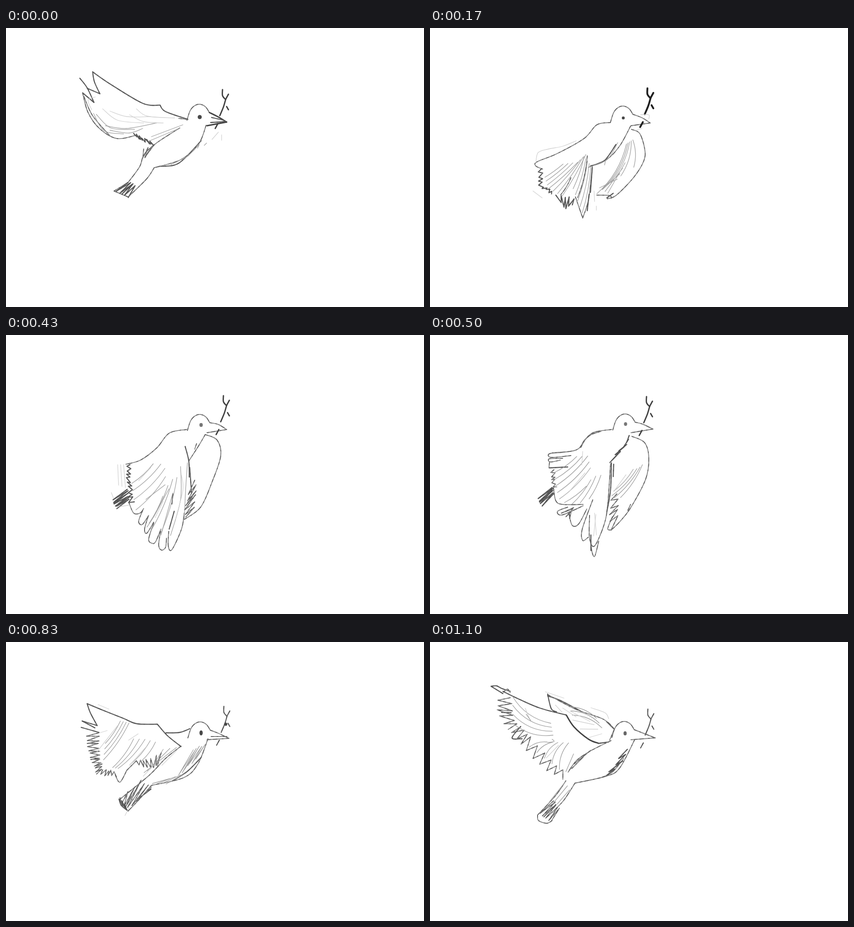
Animation of 917x611 px, one loop 1170 ms. Source, as an HTML page with a canvas:

```html
<!DOCTYPE html>
<html lang="en">
<head>
<meta charset="utf-8">
<title>Dove in flight</title>
<style>
html, body { margin: 0; width: 100%; height: 100%; overflow: hidden; background: #fff; }
canvas { display: block; width: 100%; height: 100%; }
</style>
</head>
<body>
<canvas width="917" height="611"></canvas>
<script>
const ctx = document.querySelector("canvas").getContext("2d");
const tones = {
  faint: ["#d2d2d2", 1.3],
  thin: ["#a0a0a0", 1.3],
  line: ["#868686", 1.9],
  dark: ["#606060", 2.3],
  twig: ["#414141", 2.9],
  ink: ["#202020", 4]
};

function parse(text) {
  const n = text.trim().split(/\s+/).map(Number);
  return n.filter((_, i) => i % 2 === 0).map((x, i) => [x, n[2 * i + 1]]);
}

function stroke(tone, path) {
  [ctx.strokeStyle, ctx.lineWidth] = tones[tone];
  ctx.setLineDash([]);
  ctx.stroke(path);
  if (tone !== "line" && tone !== "dark") return;
  // Broken darker strokes give the outlines an uneven pencil pressure.
  ctx.strokeStyle = "rgba(72,72,72,.65)";
  ctx.lineWidth = 1.7;
  ctx.setLineDash([5, 8, 2, 11, 8, 6]);
  ctx.stroke(path);
}

// Smooth strokes through points; commas separate the strokes.
function curve(tone, text) {
  for (const part of text.split(",")) {
    const p = parse(part), path = new Path2D();
    path.moveTo(...p[0]);
    for (let i = 1; i < p.length; i++) {
      const a = p[i - 1], b = p[i], before = p[i - 2] || a, after = p[i + 1] || b;
      path.bezierCurveTo(
        a[0] + (b[0] - before[0]) / 6, a[1] + (b[1] - before[1]) / 6,
        b[0] - (after[0] - a[0]) / 6, b[1] - (after[1] - a[1]) / 6, ...b);
    }
    stroke(tone, path);
  }
}

// Point at share t of a guide polyline.
function along(p, t) {
  const s = t * (p.length - 1), i = Math.min(Math.floor(s), p.length - 2);
  return [0, 1].map(k => p[i][k] + (p[i + 1][k] - p[i][k]) * (s - i));
}

// Pencil hatching that runs back and forth between two guides.
function zig(tone, count, from, to) {
  const guides = [parse(from), parse(to)], path = new Path2D();
  for (let i = 0; i <= count; i++) {
    const [x, y] = along(guides[i % 2], i / count);
    path.lineTo(x + 1.5 * Math.sin(i * 7), y + 1.5 * Math.sin(i * 5));
  }
  stroke(tone, path);
}

// Bowed feather lines from one guide to another.
function fan(tone, count, from, to, bow = 0) {
  const a = parse(from), b = parse(to), path = new Path2D();
  for (let i = 0; i < count; i++) {
    const [x, y] = along(a, i / (count - 1)), [u, v] = along(b, i / (count - 1));
    path.moveTo(x, y);
    path.quadraticCurveTo((x + u) / 2 - (v - y) * bow, (y + v) / 2 + (u - x) * bow, u, v);
  }
  stroke(tone, path);
}

function head(x, y, tipX, tipY, beak) {
  ctx.save();
  ctx.translate(x, y);
  curve("line", "397 207 404 186 414 175 426 172 438 178 446 190");
  ctx.restore();
  curve(beak, `${446 + x} ${190 + y} 466 ${tipY - 11} ${tipX} ${tipY}, ${tipX} ${tipY} 441 214`);
}

function eye(x, y, rx, ry = rx, color = "#484848") {
  ctx.fillStyle = color;
  ctx.beginPath();
  ctx.ellipse(x, y, rx, ry, 0, 0, 7);
  ctx.fill();
}

function twig(x, y, tone = "twig", stub = true) {
  ctx.save();
  ctx.translate(x, y);
  curve(tone, "0 0 0 13 6 21, 13 10 7 21, 7 21 2 38 -6 57, 9 37 13 44");
  if (stub) curve(tone, "-10 74 -16 85");
  ctx.restore();
}

function raised() {
  head(0, -5, 484, 206, "twig");
  curve("dark", "451 196 478 202, 449 207 481 205");
  eye(425, 195, 4.5);
  twig(475, 135);
  curve("dark", "190 96 229 123 300 165 338 169, 338 169 350 183 399 200, 162 110 178 131 193 163");
  curve("dark", "168 142 193 163, 178 132 206 144, 206 144 194 118 190 96, 336 303 379 296 428 247");
  curve("line", "168 142 180 185 205 220 243 242 285 235, 171 150 190 192 228 236, 398 200 379 198");
  curve("line", "381 219 330 252 303 277 293 304 268 338, 439 213 423 253 384 288 325 306");
  curve("line", "325 306 308 331 268 370, 268 370 237 357, 237 357 268 338");
  zig("dark", 17, "280 231 319 250", "284 239 324 257");
  zig("dark", 9, "268 338 286 345", "238 357 268 370");
  zig("thin", 13, "345 301 395 285 428 250", "340 304 385 291 420 262");
  zig("line", 6, "302 265 327 257", "297 288 310 278");
  curve("thin", "198 189 230 219 282 222, 192 187 215 225 258 232, 218 214 264 220 330 208");
  curve("thin", "228 224 270 230 300 220, 319 238 388 212, 313 248 382 219, 440 252 435 257");
  curve("faint", "212 177 245 202 302 208, 228 182 265 194 317 194, 271 190 302 205 345 208");
  curve("faint", "286 177 310 193 370 197, 466 228 452 244, 473 234 473 246, 196 151 180 158 188 179");
}

function falling() {
  head(-1, -1, 483, 208, "line");
  eye(424, 197, 3.2);
  twig(477, 132, "ink");
  curve("line", "396 207 366 212 338 242 279 275 235 293 232 302 247 309");
  curve("line", "442 222 460 231 471 265 469 291 447 327 409 366 389 374, 366 366 394 367 398 373");
  curve("line", "440 215 417 257 390 286 348 305, 319 370 335 416, 335 416 348 375 356 304");
  curve("dark", "345 400 349 364, 352 360 356 306, 352 302 382 291 408 255, 388 372 402 362");
  zig("dark", 15, "245 308 248 347 271 358", "236 312 240 347 268 364");
  zig("dark", 9, "276 366 322 374", "284 380 297 397 312 386");
  fan("thin", 7, "292 298 324 294 342 277", "252 327 260 352 290 368", -0.04);
  fan("thin", 5, "338 281 353 302", "314 352 334 405", -0.06);
  fan("thin", 5, "431 254 445 245", "366 363 390 343 447 305", -0.16);
  fan("thin", 4, "411 331 428 295", "372 350 390 362");
  fan("line", 2, "309 328 345 280", "287 365 324 371", -0.08);
  curve("thin", "357 302 390 287 412 251, 385 290 383 300");
  curve("faint", "232 298 237 273 260 265 291 259 321 247, 226 357 246 372, 360 357 361 380, 365 390 365 399");
  curve("faint", "462 190 480 190 480 199, 451 224 465 220");
}

function folded() {
  head(1, 2, 484, 207, "line");
  eye(428, 197, 3.7, 4.2, "#777");
  twig(477, 133);
  curve("line", "396 207 358 215 331 247 295 274 263 283, 437 218 463 230 471 265 452 322 427 377 391 404");
  curve("line", "437 218 423 242 401 276, 418 238 414 250");
  curve("line", "270 368 280 390 294 390 302 380, 300 384 291 408 299 415 313 395");
  curve("line", "312 397 304 425 309 434 324 410, 324 412 313 447 320 456 328 453 340 425");
  curve("line", "339 430 335 460 341 471 350 465 352 445, 357 430 356 462 364 470 385 425 391 390");
  curve("dark", "393 244 401 276 402 311, 403 290 407 345, 369 386 358 425, 366 348 364 370");
  curve("thin", "398 280 394 340 391 404, 383 288 383 360 361 439");
  zig("dark", 18, "272 284 274 327 281 364", "264 285 266 321 270 373");
  zig("line", 11, "414 318 418 348 411 384", "400 345 394 377 393 400");
  zig("dark", 13, "266 338 269 362", "233 361 243 379");
  fan("thin", 4, "323 282 348 283 350 310", "276 325 279 349 285 383", -0.09);
  fan("thin", 4, "344 353 361 318 375 312", "314 412 307 425 336 442", -0.07);
  fan("thin", 3, "349 328 366 346", "307 360 340 438");
  fan("faint", 3, "245 284 258 284", "247 329 262 334");
  curve("faint", "291 319 318 290, 327 400 345 364, 385 307 388 340 372 403, 231 345 236 358, 250 376 272 372");
}

function lowest() {
  head(4, 1, 489, 206, "line");
  eye(429, 195, 3.5, 4, "#777");
  twig(475, 135);
  curve("line", "398 207 360 213 340 229 327 248 307 255 268 258");
  curve("line", "290 257 262 260 266 268 309 264, 291 270 262 271 264 278 286 274, 262 279 261 291");
  curve("line", "443 222 471 236 480 270 473 316 441 377 418 407 398 427, 398 427 390 424 400 398");
  curve("line", "271 335 276 363 291 371 336 371, 302 377 280 386 290 394 336 374");
  curve("line", "305 393 312 417 326 414 344 381, 357 361 334 425 335 450 347 443");
  curve("line", "350 395 350 445 361 462 382 415 390 370 396 282, 353 438 354 468 361 485 370 452");
  curve("dark", "262 291 302 289, 398 280 396 340 388 387, 403 283 402 310, 353 438 353 472");
  zig("dark", 11, "437 220 429 245 406 265", "434 233 413 256 393 281");
  zig("line", 10, "272 295 277 333", "263 299 271 335");
  zig("line", 9, "410 348 413 375 413 400", "396 356 394 390 398 424");
  zig("line", 6, "315 378 307 388", "282 389 312 405");
  zig("dark", 10, "268 334 271 347", "235 358 247 375");
  fan("thin", 5, "322 266 346 265 352 291", "273 301 275 331 284 359", -0.09);
  fan("thin", 4, "375 307 358 310 343 331", "349 359 320 372 295 367", -0.08);
  fan("thin", 4, "446 294 458 292 466 284", "403 342 397 357 418 356", -0.1);
  curve("line", "331 246 341 229 354 218 375 211, 434 384 440 371");
  curve("faint", "335 255 333 285, 307 341 340 302, 361 390 365 438, 405 340 430 306, 364 393 359 440");
}

function recovering() {
  head(2, 4, 489, 212, "line");
  curve("dark", "467 202 488 208");
  eye(427, 197, 3, 3.8);
  eye(485, 179, 2.5);
  twig(478, 142, "dark", false);
  curve("dark", "405 212 386 212 361 197 339 204 320 230, 222 276 216 312 219 343");
  curve("line", "320 230 300 253 273 263 226 277, 219 343 224 367 238 384 253 404, 365 194 370 187 374 192");
  curve("line", "231 374 270 379, 266 386 264 405, 264 397 267 417 275 430 295 438, 295 438 295 413");
  curve("line", "295 430 309 457 314 431, 318 412 309 446 328 472, 328 472 329 434, 329 450 353 488");
  curve("line", "353 488 344 430 341 395 347 324, 347 322 384 302, 445 215 417 272 384 298 356 311");
  curve("dark", "343 330 346 350 343 412, 449 220 465 265 464 319 455 364 433 407, 386 305 388 320 396 334");
  zig("dark", 7, "395 330 414 350 434 359", "393 352 402 381 413 402 433 407");
  zig("dark", 6, "221 304 220 323", "213 311 215 324");
  zig("line", 11, "361 213 402 234", "355 261 373 264");
  zig("line", 10, "387 270 415 253 442 219", "380 288 398 283 437 232");
  zig("dark", 4, "376 227 397 237", "402 234 376 247");
  fan("thin", 6, "295 265 332 264", "274 391 292 410 296 398", -0.16);
  fan("thin", 7, "268 276 300 295 304 345 266 371", "222 302 222 333 225 371 243 384");
  fan("thin", 3, "309 328 302 346 331 292", "304 409 282 402 287 313", -0.08);
  fan("thin", 4, "421 276 439 256", "410 322 429 341", -0.2);
  fan("faint", 4, "256 285 309 284", "250 355 306 430", 0.05);
  fan("faint", 3, "410 281 425 269", "405 327 410 344", -0.3);
  curve("faint", "464 239 474 258 464 355, 491 176 493 185, 485 205 485 215, 381 330 353 343");
  curve("dark", "430 347 434 350, 454 354 458 338");
}

function sweeping() {
  head(2, 3, 489, 211, "line");
  curve("line", "450 207 485 207");
  eye(428, 199, 3.6, 5.5);
  twig(478, 141, "dark");
  eye(482, 180, 3.5);
  curve("dark", "178 135 214 150 257 167 287 179 332 180, 332 180 354 205 384 229, 351 199 381 198 403 190");
  curve("dark", "178 135 185 155 200 183, 200 183 167 173, 167 173 195 188, 165 187 204 198");
  curve("line", "443 212 421 267 390 297 319 314, 319 314 292 345 268 370, 384 228 350 255 314 292 249 345");
  curve("line", "240 292 250 307 265 281, 265 281 285 261");
  curve("dark", "365 304 397 284 428 253, 318 322 288 345, 248 344 253 358 268 370");
  zig("line", 25, "203 199 205 250 212 280", "175 204 184 250 200 290");
  zig("line", 9, "212 280 241 283", "202 291 242 294");
  zig("line", 13, "286 260 310 258 345 240", "286 270 318 276 332 270");
  zig("line", 12, "250 341 298 304 318 318", "251 353 264 366 288 348");
  zig("dark", 6, "248 344 262 358", "253 359 268 369");
  zig("thin", 11, "411 236 438 224", "374 296 415 258");
  fan("thin", 4, "251 173 270 177", "218 222 214 258", -0.08);
  fan("thin", 5, "280 212 305 213 328 219", "234 275 246 277 298 260", -0.1);
  fan("thin", 3, "345 235 374 231", "317 278 303 286");
  fan("thin", 4, "321 310 351 311", "360 299 395 287");
  fan("faint", 3, "245 183 308 229 376 236", "200 240 271 270 342 270");
  curve("faint", "202 137 226 147, 205 199 222 194, 301 294 324 270, 261 380 270 363, 269 215 290 201");
}

function high() {
  head(2, 2, 494, 210, "line");
  eye(428, 200, 3.5, 4.5, "#666");
  twig(478, 147, "dark");
  curve("dark", "160 108 197 126 242 145 299 160, 134 97 146 96 158 102 176 108, 134 97 160 113");
  curve("twig", "299 160 316 186 348 213 370 222");
  curve("dark", "370 222 392 219, 258 114 266 146 278 153, 258 118 286 128 330 151, 387 174 403 190");
  curve("line", "258 115 319 147 380 169 405 191, 404 192 394 215, 161 110 170 103 176 111");
  curve("line", "397 216 353 238 322 259 303 285, 316 267 353 237, 311 277 337 251");
  curve("line", "449 214 416 276 386 294 318 309, 318 309 294 346 272 369, 298 304 275 337 236 379");
  curve("line", "236 379 238 391 256 397 268 391, 378 296 400 285 425 255");
  curve("dark", "199 185 180 210 202 212, 157 154 178 155");
  zig("line", 11, "176 122 182 160 191 184", "148 124 148 151 170 193");
  zig("line", 17, "197 187 220 206 260 255 300 287", "172 194 204 228 241 272 292 301");
  zig("line", 11, "271 348 284 366", "238 375 265 393");
  zig("dark", 10, "433 235 420 265 396 285", "416 251 400 279 384 294");
  fan("thin", 3, "297 306 306 324", "262 350 279 355");
  fan("thin", 4, "181 119 182 178", "265 178 270 204", 0.22);
  fan("thin", 5, "257 219 304 221", "218 230 284 279", 0.2);
  fan("thin", 3, "306 142 312 160", "365 167 377 188", -0.2);
  fan("faint", 3, "313 171 346 210", "360 181 377 201");
  fan("faint", 3, "275 138 307 151", "290 154 351 174");
  curve("faint", "253 109 294 123, 353 144 384 155 392 168, 209 145 218 168, 255 254 282 226");
  curve("thin", "315 245 298 284, 268 213 272 218 258 220, 211 158 221 172");
}

const poses = [raised, falling, folded, lowest, recovering, sweeping, high];
const ends = [170, 330, 500, 670, 830, 1000, 1170];

function draw(now) {
  const time = now % 1170;
  ctx.clearRect(0, 0, 917, 611);
  ctx.lineCap = ctx.lineJoin = "round";
  poses[ends.findIndex(end => time < end)]();
  requestAnimationFrame(draw);
}
draw(performance.now());
</script>
</body>
</html>
```
